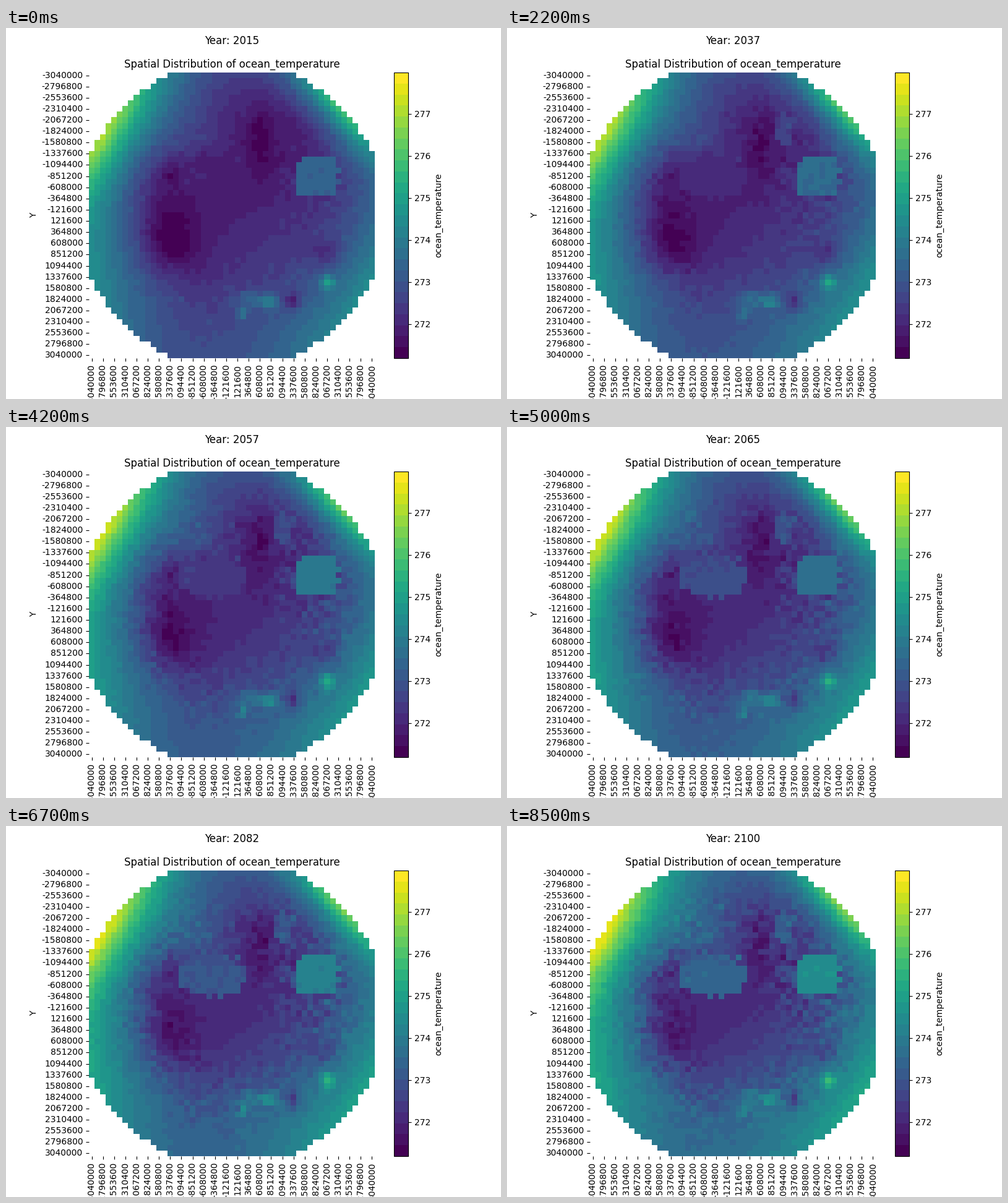
Recreate the animation shown at these times as a matplotlib script. Size 800 by 600 pixels, loop 8.6 s.

```python
import numpy as np
import matplotlib as mpl
import matplotlib.pyplot as plt
from matplotlib.animation import FuncAnimation

N = 51
FIRST, LAST = 2015, 2100
VMIN, VMAX = 271.19, 277.985

# grid coordinates from -1 to 1, v pointing down
axis = (np.arange(N) - N // 2) / (N / 2)
u, v = np.meshgrid(axis, axis)
r = np.hypot(u, v)
theta = np.degrees(np.arctan2(v, u))
outside = r * N / 2 > 750 ** .5

rng = np.random.default_rng(7)
fixed = np.clip(rng.normal(size=(N, N)), -1.8, 1.8)
sway = rng.normal(size=(N, N))
rough = rng.uniform(-.3, .3, (N, N))


def lobe(center, width):
    """Bell curve over the angle around the pole."""
    turn = (theta - center + 180) % 360 - 180
    return np.exp(-.5 * (turn / width) ** 2)


def blob(x, y, rx, ry=None):
    """Soft round bump."""
    return np.exp(-((u - x) / rx) ** 2 - ((v - y) / (ry or rx)) ** 2)


def shelf(x, y, rx, ry, power=2):
    """Area with a sharp, ragged border."""
    size = np.abs((u - x) / rx) ** power + np.abs((v - y) / ry) ** power
    return size + rough < 1


# warm rim, cold core and how steeply one turns into the other
rim = (.2 + .47 * lobe(-44, 15) + .62 * lobe(-146, 22)
       + .27 * lobe(160, 25) + .27 * lobe(32, 32))
core = np.maximum(.105 + .1 * u + .13 * v, .06)
steep = .9 + 3 * lobe(-48, 22) + .8 * lobe(-146, 22) + 1.5 * lobe(25, 35)
ocean = core + (rim - core) * np.clip((r - .45) / .6, 0, 1) ** steep

# bright and dark spots along the southern and eastern coast
ocean += .14 * blob(.15, .59, .13, .06) + .15 * blob(.27, .61, .06, .04)
ocean += .14 * blob(.07, .69, .04) + .24 * blob(.67, .47, .05)
ocean -= .16 * blob(.42, .6, .06) + .1 * blob(.66, .26, .09)
ocean -= .06 * blob(.2, -.5, .08, .3) + .06 * blob(-.43, -.29, .07)

warming = .03 + .08 * np.minimum(1, (r / .75) ** 2)
west_slope = blob(-.2, -.45, .28)
basin = blob(-.45, .2, .2)
inlet_north = shelf(.36, -.6, .08, .11)
shelf_west = shelf(-.15, -.27, .24, .16)
shelf_east = shelf(.6, -.28, .15, .145, 4)
coast = np.exp(-.5 * ((r - .6) / .2) ** 2) * (1 + 1.5 * lobe(-22, 18))
coast[shelf_east] *= .1


def field(year):
    t = (year - FIRST) / (LAST - FIRST)
    swing = .07 * (1 - t) * np.cos(2 * np.pi * (year - FIRST) / 20)
    level = ocean + t * warming
    level += (.08 + .06 * t) * west_slope - .12 * (1 - .5 * t) * basin
    level[inlet_north] = .1 + .2 * t ** .5
    level[shelf_west] = .16 + .17 * t ** 2 - .7 * swing
    level[shelf_east] = .24 + .25 * t + swing
    grain = .8 * fixed + .3 * sway * np.sin(.5 * year + 6 * rough)
    level += (.012 + .03 * t) * coast * grain
    level = np.clip(level, .015, .985)
    return np.ma.masked_where(outside, VMIN + level * (VMAX - VMIN))


plt.rcParams["font.family"] = "DejaVu Sans"
fig, ax = plt.subplots(figsize=(8, 6), dpi=100)
cmap = mpl.colormaps["viridis"].resampled(26)
mesh = ax.pcolormesh(field(FIRST), cmap=cmap, vmin=VMIN, vmax=VMAX)
ax.set(xlim=(0, N), ylim=(N, 0), aspect="equal", ylabel="Y",
       title="Spatial Distribution of ocean_temperature")
ax.spines[:].set_visible(False)

ticks = np.arange(0, N, 2) + .5
labels = [str(m) for m in range(-3040000, 3040001, 243200)]
ax.set_xticks(ticks, labels, rotation=90)
ax.set_yticks(ticks, labels, va="center")
fig.colorbar(mesh, ax=ax, label="ocean_temperature", ticks=range(272, 278))
heading = ax.text(.5, 1.1, f"Year: {FIRST}", transform=ax.transAxes,
                  ha="center", fontsize=12)


def update(i):
    year = FIRST + i
    mesh.set_array(field(year))
    heading.set_text(f"Year: {year}")
    return mesh, heading


anim = FuncAnimation(fig, update, frames=LAST - FIRST + 1, interval=100,
                     repeat=True)
plt.show()
```
